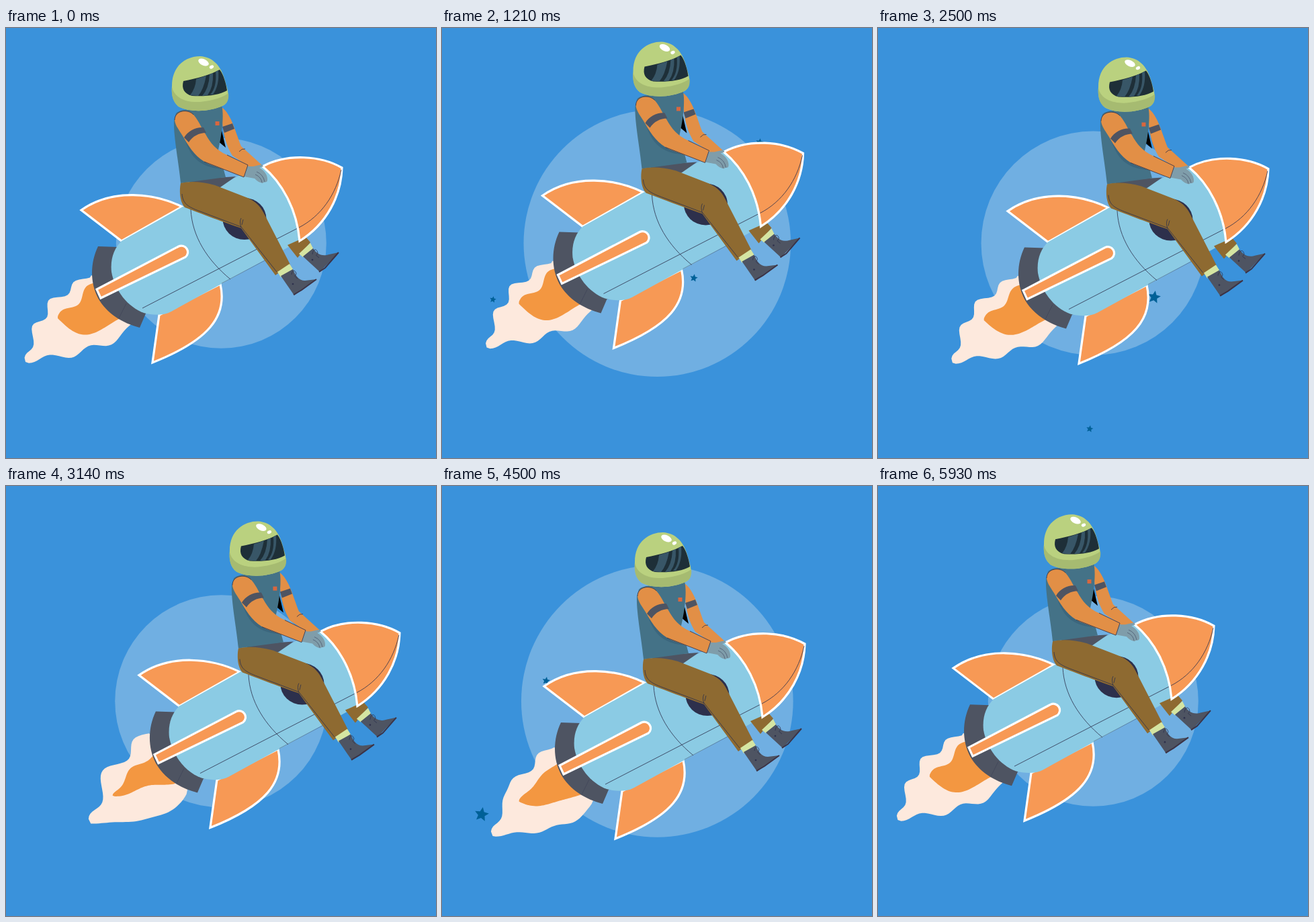
Recreate the animation shown at these times as an HTML page. Size 640 px wide and 640 px high, loop 6000 ms.

```html
<!DOCTYPE html>
<html lang="en">
<head>
<meta charset="utf-8">
<title>Rocket rider</title>
<style>
  html, body { margin: 0; width: 100%; height: 100%; overflow: hidden; background: #3a92db; }
  svg { display: block; width: 100vw; height: 100vh; }
  .fin { fill: #f79955; stroke: #fff; stroke-width: 3.2; }
  .line { fill: none; stroke: #2d304c; stroke-width: .8; }
  .dark { fill: #4e5462; }
  .sole { fill: none; stroke: #3c3346; stroke-width: 2; }
  .sleeve { fill: #e28f46; }
  .pants { fill: #8e6a31; }
  .sock { fill: #d5e5a2; }
  .glass { fill: #385667; }
</style>
</head>
<body>
<svg viewBox="0 0 640 640">
  <circle id="halo" cx="320.3" cy="320.3" fill="#70afe2"/>
  <g id="stars" fill="#006097"></g>
  <g id="ship">
    <path id="outer" fill="#fde9dd"/>
    <path id="inner" fill="#f39741"/>

    <!-- rocket -->
    <path class="dark" d="M138 325L168 326L215 424L209 425L200 446C174 439 151 425 138 402C126 379 126 350 138 325Z"/>
    <path class="line" stroke-opacity=".4" d="M180 410L169 432"/>
    <path class="fin" d="M113 271C160 238 222 246 263 266L173 317Z"/>
    <path class="fin" d="M229 427L320 381C331 430 302 465 219 498Z"/>
    <path fill="#8bcbe4" d="M173 317L264 266L345 221L384 206C412 230 434 270 438 317L247 422C236 428 220 428 206 424C182 415 163 391 158 363C156 343 162 328 173 317Z"/>
    <path class="dark" d="M270 226L343 221L320 237L290 242Z"/>
    <path class="fin" d="M136 389L258 325A9.5 9.5 0 0 1 268 341L142 402Z"/>
    <path class="line" d="M204 417L330 352L437 297M276 270C278 310 300 345 335 374"/>
    <path class="line" stroke-opacity=".5" d="M322 380L403 337"/>
    <ellipse cx="356" cy="284" rx="32.5" ry="31" fill="#2d304c"/>

    <!-- far leg and nose -->
    <path class="pants" d="M420 323L447 311L454 319L435 342Z"/>
    <path class="fin" d="M383 206C420 186 470 190 501 208C500 250 478 292 438 317C434 270 412 230 383 206Z"/>
    <path class="line" d="M437 297C470 280 492 248 500 211"/>
    <path class="sock" d="M437 336L454 320L458 328L443 341Z"/>
    <path class="dark" d="M443 340L458 328C463 335 470 341 482 337L496 334L468 363Z"/>
    <path class="sole" d="M467 363L476 357L496 334"/>
    <path class="line" d="M457 337C458 328 464 328 465 335C463 340 460 336 467 342"/>
    <circle cx="457" cy="345" r="1.3" fill="#2d304c"/>

    <!-- rider -->
    <path d="M319 140L328 178L316 168Z"/>
    <path class="sleeve" d="M322 118C336 128 341 150 351 176L383 205L368 210L338 190C327 172 322 150 322 118Z"/>
    <path class="dark" d="M323 147L338 142L341 150L326 156Z"/>
    <path class="line" d="M348 184Q352 179 357 180"/>
    <path fill="#447287" d="M254 127C260 121 272 121 280 122L322 115C326 130 322 160 317 181L328 222L261 231C258 200 250 160 251 138Z"/>
    <path fill="#38617a" opacity=".7" d="M268 168C278 198 296 208 323 210L319 197L297 166Z"/>
    <rect x="312.5" y="139" width="6" height="6" fill="#d8673f"/>
    <path fill="#7f9daa" d="M369 206L382 203L384 206L378 208C386 212 391 220 390 227C389 231 385 228 383 231C378 230 375 228 371 224L355 221L360 206Z"/>
    <path class="line" stroke-opacity=".6" d="M374 214Q384 218 386 229M372 218Q381 222 382 230"/>
    <path class="sleeve" d="M252 137C252 122 272 120 280 129C290 141 292 150 298 158C305 171 314 182 330 189L361 204L355 222L302 202C285 194 275 180 266 164C259 152 253 146 252 137Z"/>
    <path class="dark" d="M266 163C272 153 284 147 295 148L299 156C288 156 279 161 273 170Z"/>
    <path class="line" d="M252 137C252 122 272 120 280 129M296 199L355 222L361 204L330 189"/>
    <path class="pants" d="M261 231C272 228 292 228 312 234L361 253C376 260 381 268 386 278L424 352L402 368L351 298C330 291 288 275 267 267C259 258 259 241 261 231Z"/>
    <path class="line" d="M263 247C264 261 271 266 290 273L351 296L404 363M351 297Q348 288 351 283M352 293L354 285"/>
    <path class="sock" d="M405 363L423 351L428 359L410 371Z"/>
    <path class="dark" d="M410 369L428 359C432 369 437 376 446 376L463 374L430 398Z"/>
    <path class="sole" d="M429 397L441 390L463 374"/>
    <path class="line" d="M426 367C427 359 432 360 433 366C431 370 429 368 435 373"/>
    <circle cx="428" cy="381" r="1.3" fill="#2d304c"/>

    <!-- helmet -->
    <path fill="#bad17f" d="M248 86C248 55 270 42 290 42C308 43 320 55 326 75L331 93C333 105 330 112 325 115C305 125 275 126 258 117C249 110 247 98 248 86Z"/>
    <path fill="#a6bb71" d="M248 88C252 105 270 111 290 110C310 108 324 103 332 97C333 107 330 112 325 115C305 125 275 126 258 117C249 110 247 100 248 88Z"/>
    <path fill="#1e2f38" d="M265 79C285 75 305 70 319 62C325 69 329 85 330 93C318 100 300 102 278 101C266 98 262 90 265 79Z"/>
    <path class="glass" d="M284 76L299 71Q295 92 287 101L275 100Q283 90 284 76ZM304 69L309 67Q310 88 301 100L293 101Q303 90 304 69ZM313 65L317 63Q319 85 309 99L305 99Q315 88 313 65Z"/>
    <ellipse cx="295" cy="51" rx="8.3" ry="4.6" transform="rotate(25 295 51)" fill="#fff"/>
    <ellipse cx="307" cy="58" rx="3.3" ry="2.4" transform="rotate(-25 307 58)" fill="#fff"/>
  </g>
</svg>
<script>
const LOOP = 6000, HALO = 2965, FLICKER = 1200;
const el = id => document.getElementById(id);
const set = (id, name, value) => el(id).setAttribute(name, value);
const mix = (a, b, k) => a + (b - a) * k;
const mixPoint = (p, q, k) => p.map((n, i) => mix(n, q[i], k));
const ease = k => k * k * (3 - 2 * k);
const swing = (t, period) => (1 - Math.cos(t / period * 2 * Math.PI)) / 2;

// Flight: a closed Catmull-Rom curve through four stops, eased between them.
const stops = [[-1, 0], [41, -21.5], [85, 10], [39, 27]];
function flight(t) {
  const q = t / LOOP * 4, i = Math.floor(q), s = ease(q - i);
  return [0, 1].map(axis => {
    const [a, b, c, d] = [3, 4, 5, 6].map(j => stops[(i + j) % 4][axis]);
    return b + s / 2 * (c - a + s * (2 * a - 5 * b + 4 * c - d + s * (3 * b - a - 3 * c + d)));
  });
}

// Flame: two edges from nozzle to tip, each swelling outwards with a ripple.
const bulge = (height, skew, ripple, peak, period) => u =>
  height * Math.sin(Math.PI * u ** skew) +
  ripple * Math.cos(2 * Math.PI * (u - peak) / period) * Math.sin(Math.PI * u) ** .3;

function edge([x0, y0], [x1, y1], side, swell) {
  const dx = x1 - x0, dy = y1 - y0, len = side * Math.hypot(dx, dy), steps = 40;
  return Array.from({ length: steps }, (_, i) => {
    const u = i / steps, h = swell(u) / len;
    return [x0 + dx * u + dy * h, y0 + dy * u - dx * h];
  });
}

function flame(id, long, short, k) {
  const [top, low, tip] = ["top", "low", "tip"].map(p => mixPoint(long[p], short[p], k));
  const swell = name => u => mix(long[name](u), short[name](u), k);
  const points = [
    ...edge(top, tip, -1, swell("over")), tip,
    ...edge(low, tip, 1, swell("under")).reverse(), [180, 395]
  ];
  set(id, "d", "M" + points.join("L") + "Z");
}

const outerLong = {
  top: [128, 368], low: [187, 441], tip: [30, 497],
  over: bulge(22, 1, 7, .13, .285), under: bulge(15, .65, 5.5, .22, .38)
};
const outerShort = {
  top: [128, 356], low: [185, 441], tip: [43, 491],
  over: bulge(18, 1, 12, .54, .45), under: bulge(24, .65, 0, 0, 1)
};
const innerLong = {
  top: [140, 374], low: [174, 431], tip: [78, 432],
  over: bulge(0, 1, 6, .9, .66), under: bulge(25, 1.25, 0, 0, 1)
};
const innerShort = {
  top: [140, 388], low: [167, 431], tip: [73, 453],
  over: bulge(8, 1, 5, .5, .6), under: bulge(-4, .8, 4, .9, .9)
};

// Stars share one drift and life span; each has a time, place and size.
const DRIFT = [-.212, .182], LIFE = 1600, LEAD = .4;
const stars = [
  [1210, 76, 404, 5], [1210, 375, 372, 6], [1210, 473, 170, 6],
  [1860, 547, 284, 11], [1860, 451, 480, 6],
  [3930, 276, 186, 6], [3930, 576, 156, 5], [3930, 180, 385, 11],
  [5140, 379, 557, 10.5]
];
const starPath = "M" + Array.from({ length: 10 }, (_, i) => {
  const a = i * Math.PI / 5, r = i % 2 ? .47 : 1;
  return [r * Math.sin(a), -r * Math.cos(a)];
}).join("L") + "Z";
stars.forEach((_, i) => {
  const node = document.createElementNS("http://www.w3.org/2000/svg", "path");
  node.id = "star" + i;
  node.setAttribute("d", starPath);
  el("stars").append(node);
});

function drawStar([seen, x, y, size], i, t) {
  const dt = t - seen, u = dt / LIFE + LEAD;
  const r = size * Math.max(0, Math.min(1, 4.5 * u, 4.5 * (1 - u)));
  set("star" + i, "transform",
    `translate(${x + DRIFT[0] * dt} ${y + DRIFT[1] * dt}) rotate(10) scale(${r})`);
}

function draw(t) {
  const k = swing(t, FLICKER);
  set("ship", "transform", `translate(${flight(t)})`);
  set("halo", "r", mix(156.5, 202.5, swing(t, HALO)));
  flame("outer", outerLong, outerShort, k);
  flame("inner", innerLong, innerShort, k);
  stars.forEach((star, i) => drawStar(star, i, t));
}

const start = performance.now();
function tick() {
  draw((performance.now() - start) % LOOP);
  requestAnimationFrame(tick);
}
tick();
</script>
</body>
</html>
```
